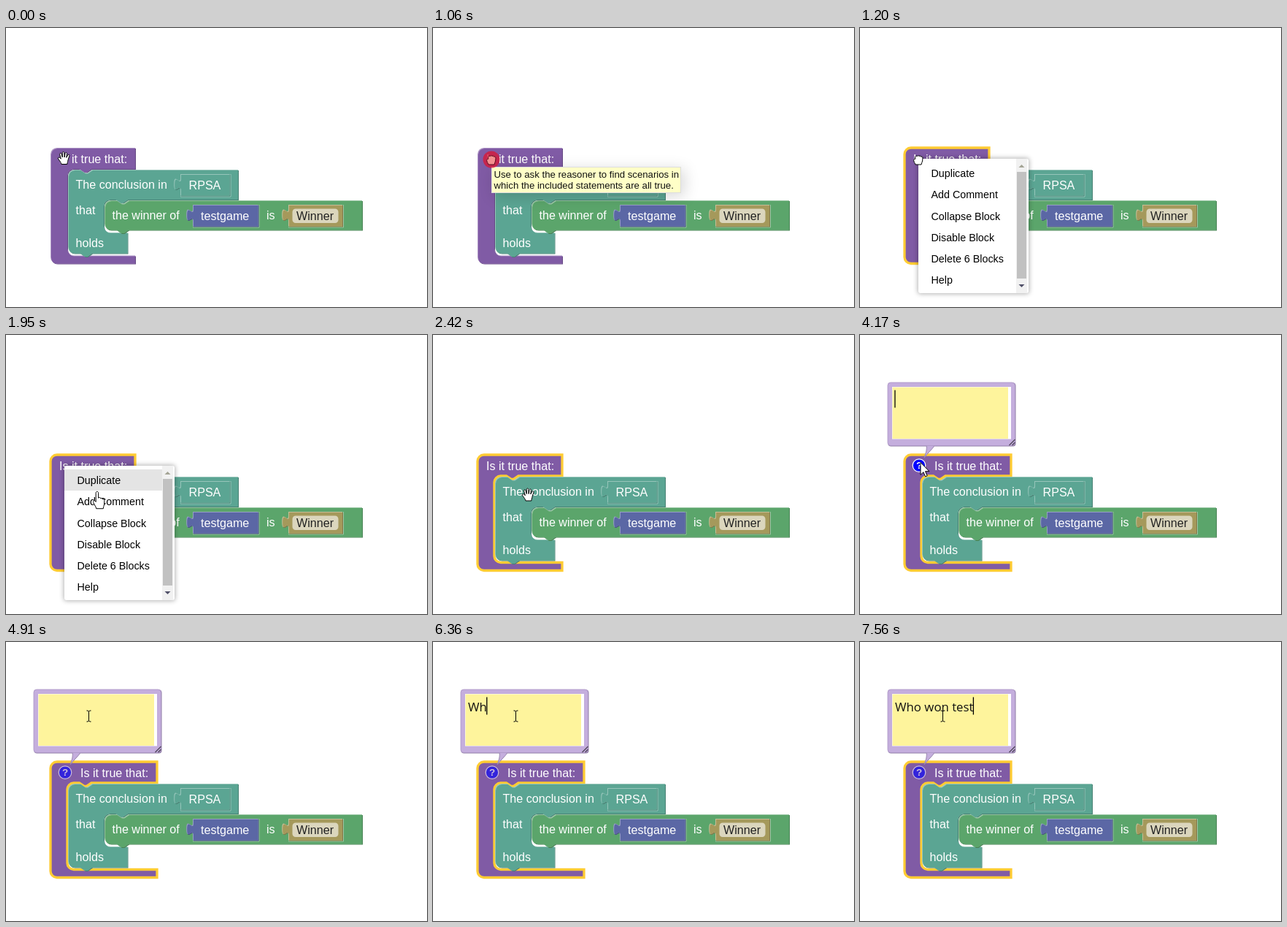
Write an HTML page that moves like this. It is 577x382 px and loops after 8 s.

```html
<!DOCTYPE html>
<html lang="en">
<head>
<meta charset="utf-8">
<title>Adding a comment to a block</title>
<style>
html, body { margin: 0; width: 100%; height: 100%; overflow: hidden; background: #fff; }
body { position: relative; font-family: "Liberation Sans", Arial, sans-serif; }
svg { position: absolute; left: 0; top: 0; }
.label { font-size: 16.13px; fill: #fff; }
#note { font: 16.8px "Open Sans", "Noto Sans", sans-serif; fill: #111; white-space: pre; }
#tip {
  position: absolute; left: 80px; top: 190px; width: 258px; height: 34px;
  background: #ffffc7; border: 1px solid #ddd; color: #111;
  box-shadow: 4px 4px 20px 1px rgba(0, 0, 0, .15);
  font-size: 13.2px; line-height: 15px; white-space: pre;
}
#tip span { position: absolute; left: 2.5px; top: 2px; }
#menu {
  position: absolute; left: 80px; top: 179px; width: 151px; height: 184px;
  box-sizing: border-box; padding-top: 5px; background: #fff; border-radius: 3px;
  box-shadow: 0 0 6px 1px rgba(0, 0, 0, .3); font-size: 14.3px; line-height: 31px; color: #000;
}
#menu div { width: 117px; height: 29.3px; padding-left: 17.5px; white-space: nowrap; }
#menu div.on { background: #e4e4e4; }
#menu svg { left: 134px; }
</style>
</head>
<body>
<svg id="scene" width="577" height="382">
  <g id="blocks"></g>
  <g id="icon">
    <circle cx="81" cy="178.6" r="8.8" fill="#00f" stroke="#fff" stroke-width="1.2"/>
    <text x="81" y="183.4" text-anchor="middle" font-size="13.5" font-weight="bold" fill="#fff">?</text>
  </g>
  <g id="bubble">
    <rect x="38.5" y="65.5" width="175" height="87" rx="4" fill="#8d7aa3"/>
    <path d="M91,150 C92,158 90,162 88,168 C93,161 99,157 103,150 Z" fill="#c4aedd" stroke="#9784ad"/>
    <rect x="38" y="65" width="174.5" height="86.5" rx="4" fill="#c4aedd" stroke="#ab96c4" stroke-width=".8"/>
    <rect x="44" y="71" width="163" height="71.5" fill="#fff"/>
    <rect x="44.5" y="71.5" width="158.5" height="70.5" fill="#fef49c"/>
    <path d="M204.5,151 L212.5,143 M208.5,151 L212.5,147" stroke="#4d4458" stroke-width="1.3"/>
    <text id="note" x="48" y="95"></text>
    <rect id="caret" y="75.5" width="1.3" height="24" fill="#000"/>
  </g>
</svg>
<div id="tip"><span>Use to ask the reasoner to find scenarios in
which the included statements are all true.</span></div>
<div id="menu">
  <svg width="15" height="184">
    <rect width="15" height="184" fill="#f1f1f1"/>
    <rect x="1" y="18" width="13" height="146" fill="#c1c1c1"/>
    <path d="M3.5,12 L7.5,8 L11.5,12 Z" fill="#a3a394"/>
    <path d="M3.5,172 L7.5,176 L11.5,172 Z" fill="#505068"/>
  </svg>
  <div>Duplicate</div><div>Add Comment</div><div>Collapse Block</div>
  <div>Disable Block</div><div>Delete 6 Blocks</div><div>Help</div>
</div>
<svg width="577" height="382">
  <g id="cursor" stroke-linejoin="round">
    <circle id="press" r="11.5" fill="#dc1432" fill-opacity=".75"/>
    <path id="shape"/>
  </g>
</svg>
<script>
const $ = id => document.getElementById(id);
const LOOP = 8000;

// Block outlines
const R = 8.8;
const arc = (sweep, dx, dy) => `a${R},${R} 0 0 ${sweep} ${dx},${dy}`;
const notchRight = 'l6.6,4.4 3.3,0 6.6,-4.4';
const notchLeft = 'l-6.6,4.4 -3.3,0 -6.6,-4.4';
const topLeft = (x, y) => `M${x},${y + R}${arc(1, R, -R)}`;
const bottomLeft = x => `H${x + R}${arc(1, -R, -R)}Z`;
const mouth = (x, top, bottom) =>
  `V${top}H${x + 33}${notchLeft}H${x + R}${arc(0, -R, R)}V${bottom - R}${arc(0, R, R)}`;
const tab = x => `H${x + 33}${notchLeft}`;

const query = right => `${topLeft(61, 164)}H${right}${mouth(84, 193, 311.5)}H${right}V322.5${bottomLeft(61)}`;
const conclusion = `${topLeft(85, 194)}H101.5${notchRight}H318${mouth(134, 235, 280)}H166.5V308.5${tab(85)}${bottomLeft(85)}`;
const statement = `${topLeft(135, 236)}H151.5${notchRight}H488V276.5${tab(135)}${bottomLeft(135)}`;
const value = (x, y, right) =>
  `M${x},${y}H${right}V${y + 29.5}H${x}V${y + 22}c0,-11 -8.8,8.8 -8.8,-8.25 s8.8,2.75 8.8,-8.25Z`;

const TEAL = '#5ba593', GREEN = '#5ba56b';
const tone = (color, other, part) => `color-mix(in srgb, ${color}, ${other} ${part}%)`;

let clips = 0;
function block(d, color) {
  const id = 'clip' + clips++;
  return `<clipPath id="${id}"><path d="${d}"/></clipPath>
    <path d="${d}" transform="translate(1 1)" style="fill:${tone(color, 'black', 22)}"/>
    <path d="${d}" style="fill:${tone(color, 'white', 36)}"/>
    <g clip-path="url(#${id})"><path d="${d}" transform="translate(1 1)" fill="${color}"/></g>`;
}
// A value block with the lit lower right rim of the socket it sits in
const plugged = (x, y, right, color, parent) =>
  `<path d="M${x},${y + 31}H${right + 1.5}V${y}" fill="none" style="stroke:${tone(parent, 'white', 40)}"/>` +
  block(value(x, y, right), color);
const label = (x, y, text, attrs = '') => `<text class="label" x="${x}" y="${y}" ${attrs}>${text}</text>`;

$('blocks').innerHTML =
  `<g id="plain">${block(query(177), '#805ba5')}</g>
   <path id="picked" fill="#805ba5" stroke="#fc3" stroke-width="3.3"/>` +
  label(73, 185, 'Is it true that:', 'id="title"') +
  block(conclusion, TEAL) +
  label(95.5, 220, 'The conclusion in') + label(95.5, 255, 'that') + label(95.5, 300, 'holds') +
  plugged(239, 200, 306.5, TEAL, TEAL) + label(250.5, 221, 'RPSA') +
  block(statement, GREEN) +
  label(145.5, 262, 'the winner of') + label(357, 262, 'is') +
  plugged(256, 242, 345.5, '#5b67a5', GREEN) + label(267, 263, 'testgame') +
  plugged(387, 242, 461, '#a5995b', GREEN) +
  '<rect x="392.5" y="247.5" width="63" height="19.5" rx="4.4" fill="#fff" fill-opacity=".6"/>' +
  label(398, 263, 'Winner', 'style="fill:#222"');

// Cursors, each drawn around its hot spot
const shapes = {
  open: 'M-3.5,8.5 C-4,6 -6,4 -8,1 C-8.8,-.6 -6.8,-1.6 -5.5,-.2 L-4.2,1.2 L-5.8,-4.8 C-6.2,-6.8 -4,-7.3 -3.4,-5.5 L-2.2,-1 V-7 C-2.2,-9 .2,-9 .3,-7 L.6,-1 L1.6,-6.3 C2,-8.2 4.2,-7.7 4,-5.8 L3.3,-.6 L5.2,-4 C6.2,-5.6 8,-4.5 7.3,-2.8 L5.6,2.5 C5.2,5 4.5,6 4.3,8.5 Z',
  closed: 'M-4,7 C-4.3,5.5 -6,4 -6.3,1.5 C-6.5,0 -5.5,-.8 -4.3,-.6 V-3.5 C-4,-5.2 -2.2,-5 -1.8,-4.2 C-1.4,-5.8 .8,-5.6 1,-4.3 C1.5,-5.4 3.4,-5 3.5,-3.6 C4.2,-4.4 6,-3.8 6,-2 L5.6,2 C5.2,4 4.2,5 4,7 Z',
  finger: 'M-1.7,2 C-1.7,-.5 1.7,-.5 1.7,2 V9 C2.5,7.6 4.7,8 4.9,9.6 C5.8,8.8 7.4,9.2 7.6,10.7 C8.8,10.2 10,11 10,12.5 L9.8,17 C9.6,19.5 8.6,20.5 8.4,23.5 H-1.2 C-1.4,21 -3.5,19 -5,15.5 C-6,13 -4.5,11.6 -3,12.8 L-1.7,14.2 Z',
  arrow: 'M0,0 V17 L3.9,13.2 L6.6,19.3 L9.2,18.2 L6.5,12.2 H12 Z',
  beam: 'M-2.5,-7.5 H-1 L.5,-6.5 L2,-7.5 H3.5 M.5,-6.5 V6.5 M-2.5,7.5 H-1 L.5,6.5 L2,7.5 H3.5'
};

// Pointer moves: start time, step length, step count, from, to, easing
const easeOut = p => 1 - (1 - p) ** 2;
const easeBoth = p => p * p * (3 - 2 * p);
const moves = [
  [1750, 67, 6, [80, 180], [130.5, 218.5], easeOut],
  [3170, 67, 11, [130, 219], [83, 174.5], easeBoth],
  [4500, 82, 6, [83, 174.5], [113, 101.5], easeBoth]
];
function pointerAt(t) {
  let spot = t < 1060 ? [79.5, 178] : [80, 180];
  for (const [start, step, count, from, to, ease] of moves) {
    if (t < start) break;
    const k = Math.min(count, Math.floor((t - start + 10) / step) + 1);
    const p = ease(k / count);
    spot = from.map((a, i) => a + (to[i] - a) * p);
  }
  return spot;
}

const onIcon = (x, y) => Math.hypot(x - 81, y - 178.6) < 9.5;
function shapeAt(t, x, y) {
  if (t < 1060) return 'open';
  if (t < 1750) return 'closed';
  if (t < 2420) return 'finger';
  if (t < 4170) return onIcon(x, y) ? 'arrow' : 'open';
  return y < 142 ? 'beam' : 'arrow';
}

// Typing and caret
const phrase = 'Who won test';
const keys = [5570, 6300, 6400, 6490, 6690, 6830, 6960, 7090, 7290, 7380, 7470, 7560];
const BLINK = 525;

const within = (t, a, b) => t >= a && t < b;
const show = (id, on) => { $(id).style.visibility = on ? 'visible' : 'hidden'; };

function render(t) {
  const [x, y] = pointerAt(t);
  const kind = shapeAt(t, x, y);
  const pressed = within(t, 1060, 1130) || within(t, 2360, 2420) || within(t, 4040, 4170);
  const commented = t >= 2490;
  const bubble = t >= 4170;

  show('plain', t < 1130);
  show('picked', t >= 1130);
  $('picked').setAttribute('d', query(commented ? 207 : 177));
  $('title').setAttribute('x', commented ? 102 : 73);
  show('icon', commented);
  $('icon').style.opacity = onIcon(x, y) ? 1 : .6;

  show('tip', within(t, 200, 1130));
  show('menu', within(t, 1200, 2420));
  const row = t < 1810 ? -1 : t < 2010 ? 0 : 1;
  document.querySelectorAll('#menu div').forEach((el, i) => { el.className = i === row ? 'on' : ''; });

  const typed = keys.filter(k => t >= k).length;
  const since = t - (typed ? keys[typed - 1] : 4170);
  show('bubble', bubble);
  $('note').textContent = phrase.slice(0, typed);
  $('caret').setAttribute('x', 47.3 + (typed ? $('note').getComputedTextLength() : 0));
  show('caret', bubble && Math.floor(since / BLINK) % 2 === 0);

  $('cursor').setAttribute('transform', `translate(${x} ${y})`);
  show('press', pressed);
  const shape = $('shape');
  shape.setAttribute('d', shapes[kind]);
  shape.setAttribute('fill', kind === 'beam' ? 'none' : pressed ? '#f4908f' : '#fff');
  shape.setAttribute('stroke', pressed ? '#5a0a1c' : '#000');
}

const begin = performance.now();
function tick() {
  render((performance.now() - begin) % LOOP);
  requestAnimationFrame(tick);
}
tick();
</script>
</body>
</html>
```
